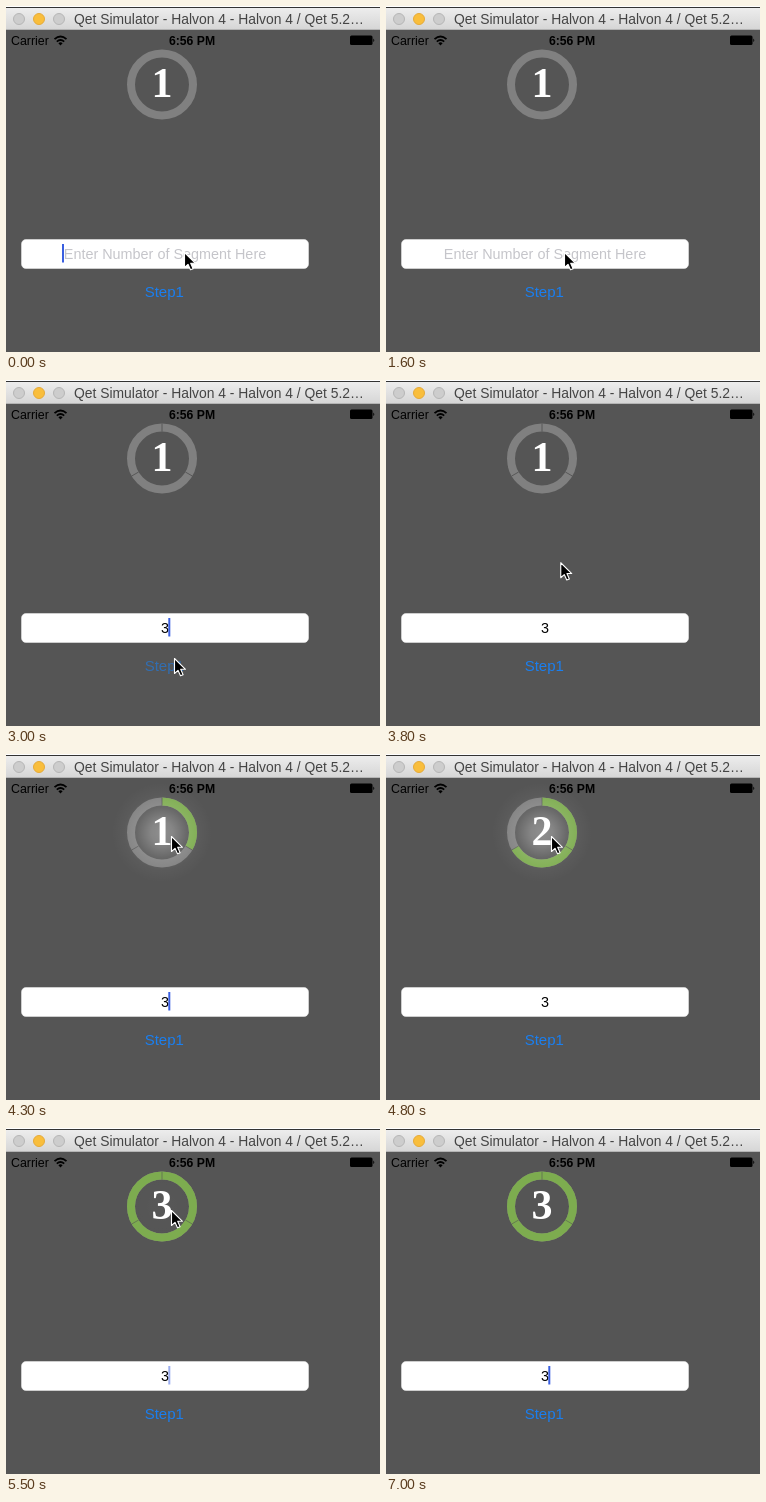
Write an HTML page that moves like this. It is 374 by 346 pixels and loops after 7.1 s.

```html
<!DOCTYPE html>
<html lang="en">
<head>
<meta charset="utf-8">
<title>Segmented ring</title>
<style>
  html, body { margin: 0; width: 100%; height: 100%; overflow: hidden; background: #555; }
  svg { display: block; width: 374px; height: 346px; }
  text { font-family: "Liberation Sans", Arial, sans-serif; }
  .digit { font: bold 42px "Liberation Serif", Times, serif; fill: #fff; }
  .mid { text-anchor: middle; }
</style>
</head>
<body>
<svg viewBox="0 0 374 346">
  <defs>
    <linearGradient id="bar" x2="0" y2="1">
      <stop offset="0" stop-color="#efefef"/>
      <stop offset="1" stop-color="#d5d5d5"/>
    </linearGradient>
    <radialGradient id="halo">
      <stop offset="0" stop-color="#fff"/>
      <stop offset=".22" stop-color="#fff" stop-opacity=".85"/>
      <stop offset=".5" stop-color="#fff" stop-opacity=".34"/>
      <stop offset=".75" stop-color="#fff" stop-opacity=".1"/>
      <stop offset="1" stop-color="#fff" stop-opacity="0"/>
    </radialGradient>
  </defs>

  <rect width="374" height="346" fill="#555"/>

  <!-- window title -->
  <rect width="374" height="24" fill="url(#bar)"/>
  <rect width="374" height="1" fill="#fff"/>
  <rect y="1" width="374" height="1" fill="#333"/>
  <rect y="23" width="374" height="1" fill="#b4b4b4"/>
  <circle cx="13" cy="13" r="5.5" fill="#cdcdcd" stroke="#b6b6b6"/>
  <circle cx="33" cy="13" r="5.5" fill="#f9be3c" stroke="#e5aa3a"/>
  <circle cx="53" cy="13" r="5.5" fill="#cdcdcd" stroke="#b6b6b6"/>
  <text x="68" y="18" font-size="13.88" fill="#444">Qet Simulator - Halvon 4 - Halvon 4 / Qet 5.2…</text>

  <!-- status bar -->
  <text x="5" y="38.5" font-size="12.4">Carrier</text>
  <g fill="none" stroke="#000" stroke-width="1.8">
    <path d="M48.5 33.2Q54.5 27.8 60.5 33.2"/>
    <path d="M50.8 35.7Q54.5 32.3 58.2 35.7"/>
  </g>
  <path d="M52.4 37.2Q54.5 35.2 56.6 37.2L54.5 39.4Z"/>
  <text class="mid" x="186" y="38.5" font-size="12.2" font-weight="bold">6:56 PM</text>
  <rect x="344" y="29.5" width="22.5" height="9.5" rx="1.5"/>
  <path d="M367.3 32.4q2 1.8 0 3.6z"/>

  <!-- ring -->
  <g transform="translate(156 78.5)">
    <circle r="31" fill="none" stroke="#808080" stroke-width="8"/>
    <circle id="done" r="31" fill="none" stroke="#7dac4f" stroke-width="8" pathLength="3" transform="rotate(-90)"/>
    <path id="cuts" stroke="#505050" fill="none"/>
    <text id="digit" class="digit mid" y="12.2"></text>
    <circle id="glow" r="50" fill="url(#halo)"/>
  </g>

  <!-- input and button -->
  <rect x="15.5" y="233.5" width="287" height="29" rx="4.5" fill="#fff" stroke="#e6e6e6" stroke-width=".6"/>
  <text id="hint" class="mid" x="159" y="252.5" font-size="14.4" fill="#c5c5ca">Enter Number of Segment Here</text>
  <text id="typed" class="mid" x="159" y="252.5" font-size="14.4">3</text>
  <rect id="caret" y="238" width="2" height="18.5" fill="#3a5fe0"/>
  <text id="step" x="138.7" y="291" font-size="15" fill="#1a7ff0">Step1</text>

  <path id="mouse" d="M0 0V15L3.5 11.8L6 17.3L8.6 16.2L6.2 10.8H11Z" stroke="#fff" stroke-width="1.1" stroke-linejoin="round"/>
</svg>
<script>
const LOOP = 7100, TICK = 100;
const TYPE = 1900, PRESS = 2900, SPLIT = 3000, LEAVE = 6200;
const TAP = 4200, TAP_GAP = 500, HOLD = 200, FADE = 400, SEGMENTS = 3;

const $ = id => document.getElementById(id);
const clamp = (v, lo = 0, hi = 1) => Math.min(hi, Math.max(lo, v));
const ease = k => k * k * (3 - 2 * k);
const show = (id, v) => { $(id).style.opacity = Number(v); };

// pointer moves: begin, end, and the place reached
const home = { x: 178.5, y: 246.5 };
const moves = [
  { from: 2100, to: 2700, x: 175, y: 284 },
  { from: 2800, to: 3000, x: 168.5, y: 278.5 },
  { from: 3000, to: 3600, x: 184, y: 283 },
  { from: 3600, to: 4000, x: 165.5, y: 82.5 },
  { from: 5800, to: LEAVE, x: 350, y: 14 }
];

function pointer(t) {
  let { x, y } = home;
  for (const m of moves) {
    const k = ease(clamp((t - m.from) / (m.to - m.from)));
    x += (m.x - x) * k;
    y += (m.y - y) * k;
  }
  return `translate(${x} ${y})`;
}

// full while a finger is down, then fading after its release
function glow(t) {
  let level = 0;
  for (let i = 0; i < SEGMENTS; i++) {
    const age = t - TAP - i * TAP_GAP;
    if (age >= -HOLD) level = Math.max(level, age < 0 ? .95 : .8 * clamp(1 - age / FADE) ** 3);
  }
  return level;
}

const blink = t => clamp((550 - t % 1000) / 100);

$("cuts").setAttribute("d", Array.from({ length: SEGMENTS }, (_, i) => {
  const a = (i / SEGMENTS - .25) * 2 * Math.PI, c = Math.cos(a), s = Math.sin(a);
  return `M${27 * c} ${27 * s}L${35 * c} ${35 * s}`;
}).join(""));

function draw(t) {
  const typed = t >= TYPE;
  const count = clamp(Math.floor((t - TAP) / TAP_GAP) + 1, 0, SEGMENTS);
  show("hint", !typed);
  show("typed", typed);
  $("caret").setAttribute("x", typed ? 162.3 : 56);
  show("caret", t === TYPE ? 1 : blink(t));
  show("step", t < PRESS ? 1 : clamp(.4 + (t - PRESS) / 500));
  show("cuts", t < SPLIT ? 0 : .85 - count * .1);
  $("done").setAttribute("stroke-dasharray", `${count} 4`);
  show("done", count > 0);
  $("digit").textContent = Math.max(1, count);
  show("glow", glow(t));
  $("mouse").setAttribute("transform", pointer(t));
  show("mouse", t < LEAVE);
}

const start = performance.now();
function loop() {
  const t = (performance.now() - start) % LOOP;
  draw(Math.floor(t / TICK) * TICK);
  requestAnimationFrame(loop);
}
loop();
</script>
</body>
</html>
```
